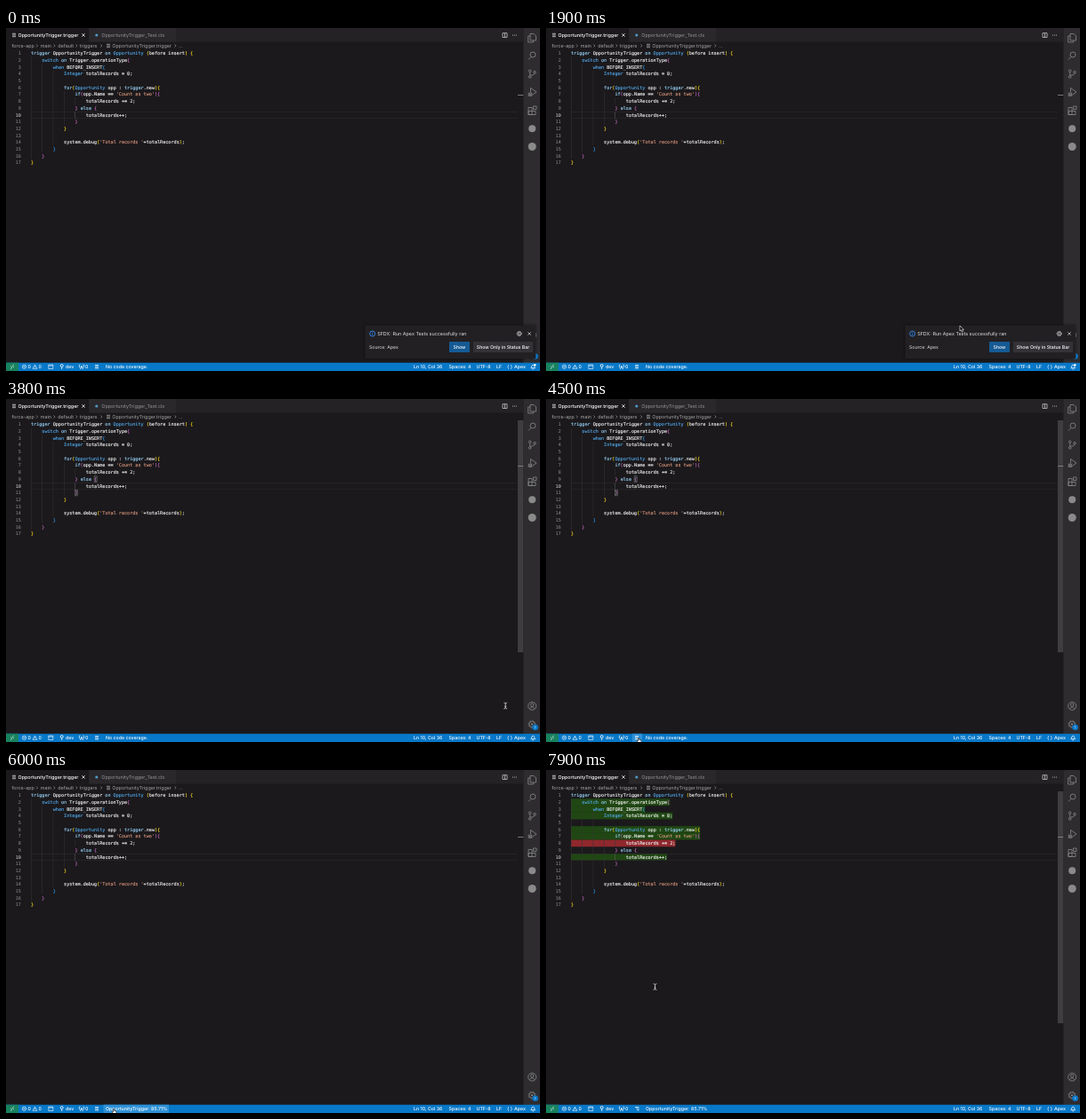
Write an HTML page that moves like this. It is 600 px wide and 386 px high and loops after 8 s.

```html
<!DOCTYPE html>
<html lang="en">
<head>
<meta charset="utf-8">
<title>Code coverage</title>
<style>
html, body { margin: 0; width: 100%; height: 100%; overflow: hidden; background: #1b191c; }
svg { display: block; width: 600px; height: 386px; }
text { font-family: Inter, "Open Sans", sans-serif; text-rendering: geometricPrecision; white-space: pre; }
.code { font-family: "DejaVu Sans Mono", monospace; font-size: 5.13px; }
.code tspan { fill: currentColor; stroke: currentColor; stroke-width: .13; }
.line { fill: none; stroke-width: .8; stroke-linejoin: round; }
</style>
</head>
<body>
<svg id="stage" viewBox="0 0 600 386"></svg>
<script>
const rect = (x, y, w, h, fill, more = '') =>
  `<rect x="${x}" y="${y}" width="${w}" height="${h}" fill="${fill}" ${more}/>`;
const dot = (x, y, r, fill) => `<circle cx="${x}" cy="${y}" r="${r}" fill="${fill}"/>`;
const ring = (x, y, r, stroke, more = '') =>
  `<circle class="line" cx="${x}" cy="${y}" r="${r}" stroke="${stroke}" ${more}/>`;
const line = (d, stroke, more = '') => `<path class="line" d="${d}" stroke="${stroke}" ${more}/>`;
const text = (x, y, s, fill, size = 5.4, more = '') =>
  `<text x="${x}" y="${y}" fill="${fill}" font-size="${size}" ${more}>${s}</text>`;
const group = (id, body) => `<g id="${id}">${body}</g>`;
const bars = (x, y, c) => line(`M${x} ${y}h4m-4 1.7h4m-4 1.7h4`, c);
const cross = (x, y, c) => line(`M${x - 1.7} ${y - 1.7}l3.4 3.4m0 -3.4l-3.4 3.4`, c);
const gear = (x, y, r, c) =>
  ring(x, y, r, c) + dot(x, y, r * .35, c) +
  ring(x, y, r + .8, c, `stroke-dasharray="1.4 ${(r + .8) * Math.PI / 4 - 1.4}"`);
const thin = 'style="stroke-width:.6"', medium = 'font-weight="500"';

// Editor text
const CHAR = 3.09, ROW = 7.7, LEFT = 28;
const source = `trigger OpportunityTrigger on Opportunity (before insert) {
    switch on Trigger.operationType{
        when BEFORE_INSERT{
            Integer totalRecords = 0;

            for(Opportunity opp : trigger.new){
                if(opp.Name == 'Count as two'){
                    totalRecords += 2;
                } else {
                    totalRecords++;
                }
            }

            system.debug('Total records '+totalRecords);
        }
    }
}`.split('\n');
const rowTop = n => 24.7 + (n - 1) * ROW;
const indent = s => s.length - s.trimStart().length;
const pairs = ['#f8d820', '#c468bd', '#2f9be8'];
let depth = 0;

function color(token) {
  if ('({'.includes(token)) return pairs[depth++ % 3];
  if (')}'.includes(token)) return pairs[--depth % 3];
  if (token[0] === "'") return '#d8957a';
  if (/^(switch|when|Opportunity|Integer)$/.test(token)) return '#52a6e6';
  if (/^(trigger|on|for|if|else)$/.test(token)) return '#96d0f6';
  return '#f2f2f2';
}

function codeRow(s, i) {
  const n = i + 1, y = rowTop(n) + 5.5, pad = indent(s);
  const tokens = s.trim().match(/'[^']*'|\w+|[(){}]|[^\w(){}']+/g) || [];
  const body = tokens.map(t => `<tspan color="${color(t)}">${t}</tspan>`).join('');
  return `<text class="code" x="16.8" y="${y}" text-anchor="end" fill="${n === 10 ? '#e0e0e0' : '#909090'}">${n}</text>` +
    `<text class="code" x="${LEFT + pad * CHAR}" y="${y}">${body}</text>`;
}

const guide = (col, from, to) =>
  rect(LEFT + col * CHAR, rowTop(from), .5, (to - from + 1) * ROW, '#363437');
const coverRow = n => rect(LEFT, rowTop(n), source[n - 1].length * CHAR, ROW, n === 8 ? '#8f282d' : '#204713') +
  rect(575.6, 24 + (n - 1) * 5.37, 2, 5.37, n === 8 ? '#b8352f' : '#3c7a22');
const box = (col, n) =>
  rect(LEFT + col * CHAR, rowTop(n) + .5, CHAR, ROW - 1, '#223028', 'stroke="#777" stroke-width=".5"');

const editor =
  rect(0, 0, 600, 386, '#1b191c') +
  group('cover', [2, 3, 4, 6, 7, 8, 10].map(coverRow).join('')) +
  rect(LEFT, rowTop(10), 547, .6, '#2c2a2d') + rect(LEFT, rowTop(11) - .6, 547, .6, '#2c2a2d') +
  guide(0, 2, 16) + guide(4, 3, 15) + guide(8, 4, 14) + guide(12, 7, 11) +
  guide(16, 8, 8) + rect(LEFT + 16 * CHAR, rowTop(10), .5, ROW, '#606060') +
  group('match', box(23, 9) + box(16, 11)) +
  source.map(codeRow).join('') +
  group('slider', rect(575, 24, 6.5, 261, '#3f3d40')) +
  rect(575, 75, 6.5, .8, '#909090');

// Tabs and breadcrumbs
const crumb = '#a8a8a8';
const chevron = x => line(`M${x} 18.4l1.6 1.6l-1.6 1.6`, crumb, thin);
const header =
  rect(0, 0, 581.5, 15.5, '#242225') + rect(0, 0, 93, 15.5, '#1b191c') + rect(93.5, 0, 97.5, 15.5, '#2a282b') +
  bars(7, 6.3, '#d8d8d8') + text(13.5, 10, 'OpportunityTrigger.trigger', '#fff', 5.4, medium) + cross(87, 8, '#eee') +
  dot(101.8, 8, 1.6, '#4d9bc4') + text(107.3, 10, 'OpportunityTrigger_Test.cls', '#959595', 5.45) +
  line('M558 5.7h5v4.8h-5zM560.5 5.7v4.8', '#c5c5c5') +
  [569.5, 571.5, 573.5].map(x => dot(x, 8, .55, '#c5c5c5')).join('') +
  text(6.5, 22, 'force-app', crumb) + chevron(34) + text(38.8, 22, 'main', crumb) + chevron(53.5) +
  text(58.3, 22, 'default', crumb) + chevron(78.5) + text(82.7, 22, 'triggers', crumb) + chevron(106.3) +
  bars(113, 18.3, crumb) + text(119.3, 22, 'OpportunityTrigger.trigger', crumb) + chevron(189.5) +
  text(194, 22, '...', crumb);

// Activity bar
const grey = '#8a8a8a';
const activity =
  rect(581.5, 0, 18.5, 377, '#2e2c2f') +
  line('M589 6.5h4l2.5 2.5v5h-6.5zM589 9h-2.3v7h6v-2', grey) +
  line('M587 35.5l3 -3', grey) + ring(592, 30, 3, grey) +
  ring(588.7, 48.3, 1.3, grey) + ring(588.7, 55, 1.3, grey) + ring(594, 49.8, 1.3, grey) +
  line('M588.7 49.6v4M594 51.2q0 2 -5 2', grey) +
  line('M589.5 72v-4.5l6.5 4.5l-4.5 3.3', grey) + ring(589, 74.7, 1.9, grey) +
  line('M586.7 73l4.6 3.5m0 -3.5l-4.6 3.5', grey) +
  line('M587 89.5h4v8h-4zM587 93.5h8v4h-8zM592.5 88h3.5v3.5h-3.5z', grey) +
  dot(591.2, 113.3, 4, grey) + dot(591.2, 133.5, 4.5, grey) +
  ring(591.2, 345.5, 4.5, grey) + ring(591.2, 344.3, 1.7, grey) +
  line('M588.2 348.8q3 -4.5 6 0', grey) +
  gear(591, 366, 3.2, grey) + dot(594.6, 369.5, 3.3, '#0a7acc') +
  text(594.6, 370.9, '1', '#fff', 3.8, 'text-anchor="middle"');

// Notification
const middle = medium + ' text-anchor="middle"';
const toast =
  rect(403.5, 334.5, 191.5, 37.5, '#222023', 'style="filter:drop-shadow(0 0 1.5px #0008)"') +
  ring(411.7, 344, 3, '#3794ff') + line('M411.7 343.5v2.2m0 -3.8v.8', '#3794ff') +
  text(417.2, 346, 'SFDX: Run Apex Tests successfully ran', '#e2e2e2', 5.43) +
  gear(576.7, 344, 1.8, '#c5c5c5') + cross(588, 344, '#c5c5c5') +
  text(408, 360.8, 'Source: Apex', '#e2e2e2', 5.2) +
  rect(498, 353, 23, 12, '#165a94') + text(509.5, 360.9, 'Show', '#fff', 5.2, middle) +
  rect(525, 353, 67, 12, '#343236') + text(558.5, 360.9, 'Show Only in Status Bar', '#fff', 5.2, middle) +
  dot(594.3, 379.2, 1.2, '#fff');

// Status bar
const label = (x, s) => text(x, 383.1, s, '#fff', 5.25, medium);
const status =
  rect(0, 376.7, 600, 9.3, '#0878c8') + rect(0, 376.7, 14, 9.3, '#18825f') +
  rect(97, 376.7, 11, 9.3, '#2e91d6', 'id="hoverIcon"') +
  rect(109.5, 376.7, 73.5, 9.3, '#2e91d6', 'id="hoverText"') +
  line('M5 380.5l1.8 1.7l-1.8 1.7M9 378.7l-1.8 1.7l1.8 1.7', '#fff', thin) +
  ring(20.5, 381.2, 2.2, '#fff', thin) + line('M19.5 380.2l2 2m0 -2l-2 2', '#fff', thin) + label(24.5, '0') +
  line('M32.5 379l2.5 4.3h-5zM32.5 380.5v1.3', '#fff', thin) + label(36.6, '0') +
  line('M47.8 379h5v4.5h-5zM47.8 380h5', '#fff', thin) +
  ring(62.7, 380, 1.5, '#fff') + line('M62.7 381.5v2.5', '#fff') + label(67, 'dev') +
  line('M83 378.5q-1.5 2 0 3.8M87 378.5q1.5 2 0 3.8M85 380.2l-1.5 3.8m1.5 -3.8l1.5 3.8', '#fff') +
  label(89, '0') +
  group('iconOff', bars(100, 379.5, '#fff')) +
  group('iconOn', line('M100 379.5h4.5m-3 1.7h3m-2 1.7h2', '#fff')) +
  group('none', label(112, 'No code coverage.')) +
  group('percent', label(112, 'OpportunityTrigger: 85.71%')) +
  label(458, 'Ln 10, Col 36') + label(497.5, 'Spaces: 4') + label(528.5, 'UTF-8') + label(551, 'LF') +
  label(563, '{ }') + label(571, 'Apex') +
  line('M589.8 382.7h4.8l-.8 -1.2v-1.2q-1.6 -2.6 -3.2 0v1.2zM591.5 384h1.4', '#fff');

// Pointer shapes, with the hot spot at the origin
const pointer = group('pointer',
  '<path id="arrow" d="M0 0v6l1.4 -1.2l1 2.3l1.2 -.5l-1 -2.2h1.8z" fill="#000" stroke="#fff" stroke-width=".6"/>' +
  '<path id="hand" d="M-.5 0q.6 -.6 1.1 0v1.8l2.2 .5q.5 2 -.5 3.2h-2.6l-1.7 -2.2q.2 -.8 1.5 0z" fill="#fff" stroke="#111" stroke-width=".6"/>' +
  '<path id="beam" class="line" d="M-1.8 -3.3q1.8 0 1.8 1v4.6q0 1 -1.8 1M1.8 -3.3q-1.8 0 -1.8 1M0 2.3q0 1 1.8 1M-1 .9h2" stroke="#ddd"/>');

document.getElementById('stage').innerHTML = editor + header + activity + status + group('toast', toast) + pointer;

const path = [
  [1500, 446, 312], [1900, 465, 335], [2500, 510, 340], [3100, 559, 344], [3400, 588, 343], [3700, 588, 343],
  [4400, 104, 381.5], [5400, 104, 381.5], [5900, 121, 381.5], [6300, 121, 381.5], [6800, 103, 382.5],
  [7200, 103, 382.5], [7900, 122.5, 244]
];

function place(t) {
  const i = path.findIndex(p => p[0] > t);
  if (i < 0) return path[path.length - 1].slice(1);
  const [t0, x0, y0] = path[i - 1], [t1, x1, y1] = path[i];
  const k = (t - t0) / (t1 - t0), e = k * k * (3 - 2 * k);
  return [x0 + (x1 - x0) * e, y0 + (y1 - y0) * e];
}

const el = id => document.getElementById(id);
const show = (id, on) => el(id).style.display = on ? '' : 'none';

function draw(t) {
  const moving = t >= 1500;
  const [x, y] = moving ? place(t) : [0, 0];
  const open = t < 3600, counted = t >= 4600;
  const covered = t >= 4600 && t < 5300 || t >= 7100;
  const onStatus = moving && y > 376.7;
  const onEditor = moving && !onStatus && x < 575 && !(open && x > 403 && y > 334);
  show('toast', open);
  show('cover', covered);
  show('iconOn', covered);
  show('iconOff', !covered);
  show('none', !counted);
  show('percent', counted);
  show('match', t >= 3700 && t < 4600);
  show('slider', t >= 3700 && t < 4800 || t >= 7200);
  show('hoverIcon', onStatus && x > 97 && x < 108);
  show('hoverText', onStatus && x > 109.5 && x < 183);
  show('pointer', moving);
  show('hand', onStatus);
  show('beam', onEditor);
  show('arrow', !onStatus && !onEditor);
  el('pointer').setAttribute('transform', `translate(${x} ${y})`);
}

const start = performance.now();
function tick() {
  draw(Math.floor((performance.now() - start) % 8000 / 100) * 100);
  requestAnimationFrame(tick);
}
tick();
</script>
</body>
</html>
```
